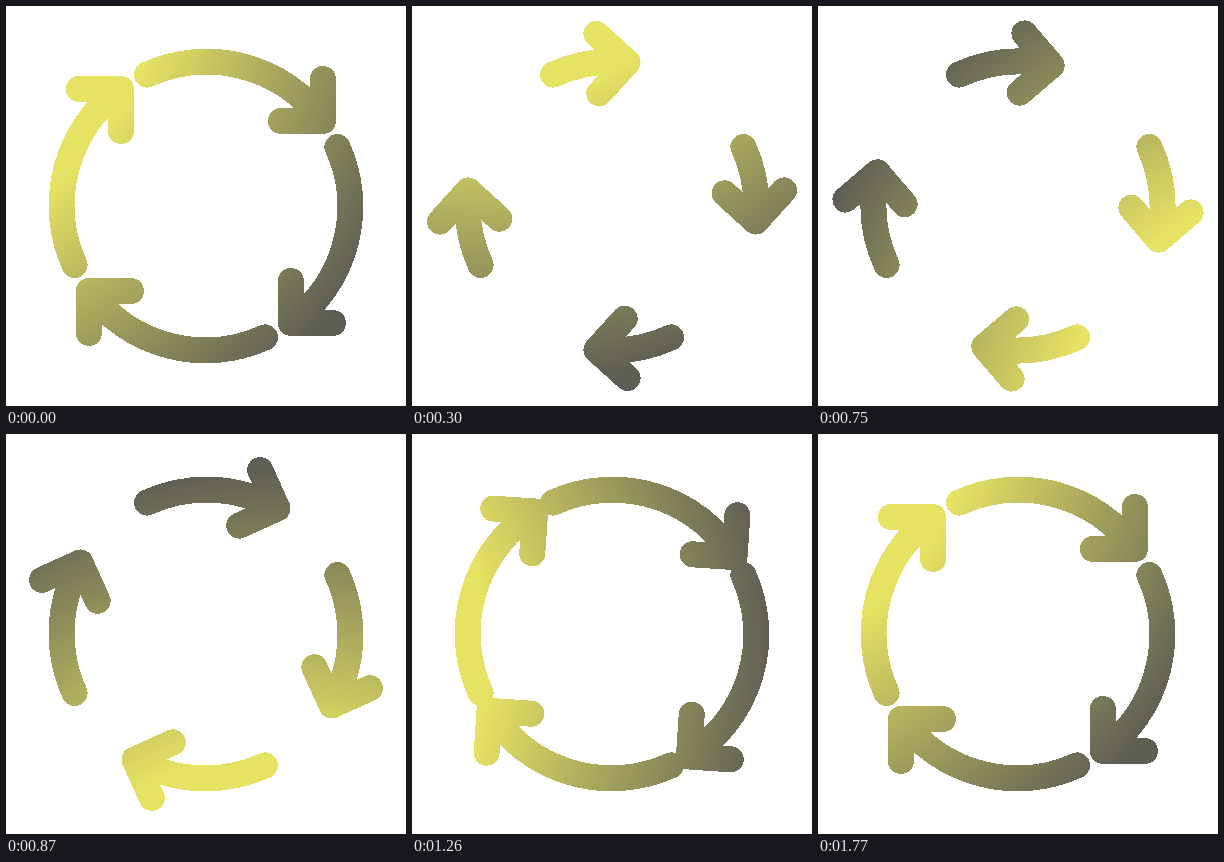
Write an HTML page that moves like this. It is 400x400 px and loops after 1830 ms.

```html
<!DOCTYPE html>
<html lang="en">
<head>
<meta charset="utf-8">
<title>Cycle arrows</title>
<style>
  html, body { margin: 0; width: 100%; height: 100%; overflow: hidden; background: #fff; }
  svg { display: block; width: 100%; height: 100%; }
</style>
</head>
<body>
<svg viewBox="-200 -200 400 400">
  <defs>
    <radialGradient id="shade" gradientUnits="userSpaceOnUse" r="560">
      <stop offset=".49" stop-color="#e6e364"/>
      <stop offset="1" stop-color="#5f5e55"/>
    </radialGradient>
  </defs>
  <path id="arrows" fill="none" stroke="url(#shade)" stroke-width="26"
        stroke-linecap="round" stroke-linejoin="round" shape-rendering="crispEdges"/>
</svg>
<script>
const LOOP = 1830, STEP = 30, LAST = 1770;
const RADIUS = 144, GLOW = 400, GLOW_START = 307;
const PULL = 48, OVERSHOOT = 4.2;
const TAIL = [-59, -131.4];
const HEAD = [[117, -127], [117, -85], [75, -85]];

const arrows = document.getElementById('arrows');
const shade = document.getElementById('shade');

const clamp = x => Math.min(1, Math.max(0, x));

// Cubic timing curve with horizontal handles at x1 and x2.
function ease(x, x1, x2) {
  x = clamp(x);
  let lo = 0, hi = 1;
  for (let i = 0; i < 24; i++) {
    const s = (lo + hi) / 2, r = 1 - s;
    if (3 * r * r * s * x1 + 3 * r * s * s * x2 + s ** 3 < x) lo = s; else hi = s;
  }
  return lo * lo * (3 - 2 * lo);
}

function rotate([x, y], degrees) {
  const a = degrees * Math.PI / 180, c = Math.cos(a), s = Math.sin(a);
  return [x * c - y * s, x * s + y * c];
}

const point = p => p.map(v => v.toFixed(2)).join(' ');

// Pull back, spring forward past rest, then settle.
function headTurn(t) {
  return -PULL * ease(t / 322, .33, .3)
       + (PULL + OVERSHOOT) * ease((t - 570) / 630, .5, .5)
       - OVERSHOOT * ease((t - 1200) / 360, .33, .67);
}

function arrow(quarter, turn) {
  const tail = point(rotate(TAIL, quarter));
  const [outer, tip, inner] = HEAD.map(p => point(rotate(p, quarter + turn)));
  return `M${tail}A${RADIUS} ${RADIUS} 0 0 1 ${tip}M${outer}L${tip}L${inner}`;
}

function draw(t) {
  const turn = headTurn(t);
  arrows.setAttribute('d', [0, 90, 180, 270].map(q => arrow(q, turn)).join(''));
  const [cx, cy] = rotate([0, -GLOW], GLOW_START + 360 * ease(t / LAST, .33, .46));
  shade.setAttribute('cx', cx);
  shade.setAttribute('cy', cy);
}

const start = performance.now();
function tick() {
  const t = (performance.now() - start) % LOOP;
  draw(Math.min(LAST, Math.floor(t / STEP) * STEP));
  requestAnimationFrame(tick);
}
tick();
</script>
</body>
</html>
```
